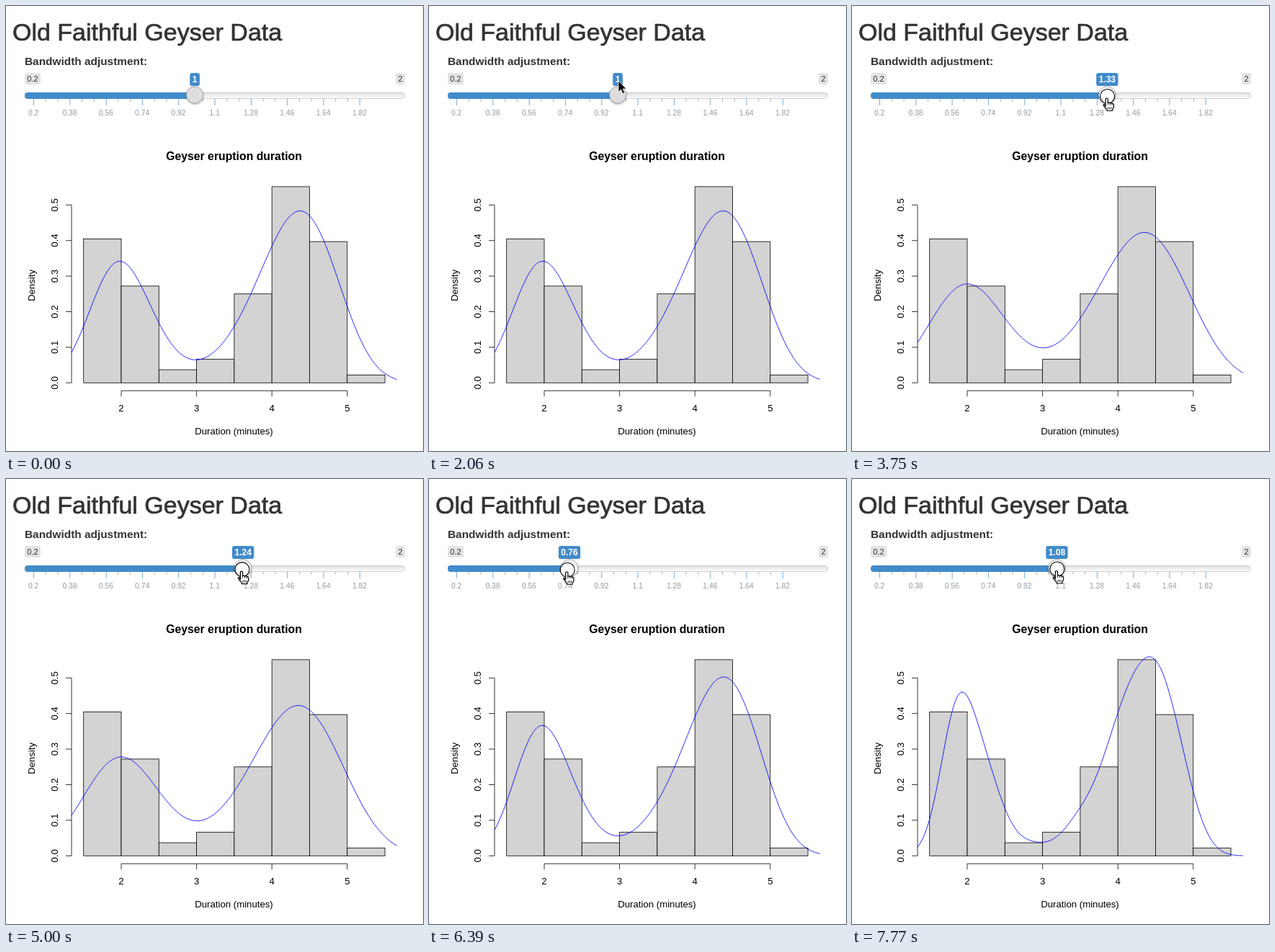
Recreate the animation shown at these times as an HTML page. Size 579 by 618 pixels, loop 8000 ms.

```html
<!DOCTYPE html>
<html lang="en">
<head>
<meta charset="utf-8">
<title>Geyser density</title>
<style>
html, body { margin: 0; width: 100%; height: 100%; overflow: hidden; background: #fff; }
svg { display: block; font-family: "Liberation Sans", Arial, sans-serif; }
.mid { text-anchor: middle; }
.line { fill: none; stroke: #000; stroke-width: .8; }
#bars rect { fill: #d3d3d3; stroke: #000; stroke-width: .8; }
#plot text { font-size: 13.2px; }
#grid text { font-size: 10.3px; fill: #939ba2; }
#knob { stroke: #ababab; filter: drop-shadow(0 1px 1.5px rgba(0, 0, 0, .35)); }
</style>
</head>
<body>
<svg width="579" height="618" viewBox="0 0 579 618">
  <defs>
    <linearGradient id="groove" x2="0" y2="1">
      <stop stop-color="#dedede"/><stop offset="1" stop-color="#fff"/>
    </linearGradient>
  </defs>
  <text x="9" y="48" font-size="34" fill="#333" stroke="#333" stroke-width=".7">Old Faithful Geyser Data</text>
  <text x="26" y="82" font-size="15.4" font-weight="bold" fill="#333">Bandwidth adjustment:</text>

  <g font-size="11" fill="#333" class="mid">
    <rect x="26" y="93" width="22" height="16" rx="3" fill="#e3e3e3"/>
    <text x="37" y="105">0.2</text>
    <rect x="541" y="93" width="13" height="16" rx="3" fill="#e3e3e3"/>
    <text x="547.5" y="105">2</text>
  </g>
  <g id="grid" class="mid"></g>
  <rect x="26.5" y="120.5" width="527" height="8" rx="4" fill="url(#groove)" stroke="#ccc"/>
  <rect id="fill" x="26" y="120" height="9" rx="4" fill="#428bca"/>
  <rect id="tag" y="93" height="18" rx="3" fill="#428bca"/>
  <text id="value" class="mid" y="106" font-size="12" font-weight="bold" fill="#fff"></text>
  <circle id="knob" cy="123.5" r="11.5"/>

  <g id="plot" class="mid">
    <text x="316.5" y="214" style="font-size:15.8px" font-weight="bold">Geyser eruption duration</text>
    <text x="316.5" y="595">Duration (minutes)</text>
    <text transform="translate(40 388) rotate(-90)">Density</text>
    <g id="bars"></g>
    <path id="axes" class="line"/>
    <path id="curve" fill="none" stroke="#00f" stroke-width=".85"/>
  </g>

  <path id="arrow" d="M0 0V15.5L3.6 12.2L6 17.8L8.6 16.7L6.2 11.2H11Z" stroke="#fff" stroke-width=".8"/>
  <g id="hand" stroke="#000">
    <circle id="press" r="10" fill="#fff" fill-opacity=".75" stroke-width="1.1"/>
    <path fill="#fff" stroke-width="1.2" stroke-linejoin="round" d="M-2.5 14V4.2q0-1.7 1.6-1.7t1.6 1.7V9q1.6-1 3 .4q1.6-.8 2.8 .6q2-.6 2.3 1.4v3.6l-1.8 3.5v1.5h-7.5v-1.2l-4.6-5.6q-1.2-2.4 1-2.2z"/>
    <path fill="none" stroke-width=".9" d="M.7 9v3M3.7 9.4v2.8M6.5 10v2.4M1 15v3M3.2 15v3M5.4 15v3"/>
  </g>
</svg>
<script>
const $ = id => document.getElementById(id);
const NS = 'http://www.w3.org/2000/svg';
function add(parent, tag, attrs, text = '') {
  const el = parent.appendChild(document.createElementNS(NS, tag));
  for (const k in attrs) el.setAttribute(k, attrs[k]);
  el.textContent = text;
}
const set = (id, attrs) => { for (const k in attrs) $(id).setAttribute(k, attrs[k]); };

// Eruption counts per 0.05 minutes, from 1.6
const counts = [
  1, 1, 1, 7, 9, 17, 6, 6, 10, 3, 5, 4, 5, 5, 3, 3, 5, 0, 1, 0, 1, 1, 0, 0,
  1, 0, 2, 0, 0, 1, 0, 0, 0, 0, 1, 3, 1, 1, 2, 2, 4, 0, 2, 4, 1, 7, 4, 4,
  6, 5, 9, 10, 2, 9, 5, 13, 6, 7, 10, 9, 9, 6, 7, 3, 9, 3, 3, 3, 1, 2, 1];
const total = 272, bandwidth = .3348;
const px = x => 160 + (x - 2) * 104.6;
const py = y => 523.3 - y * 494;

function density(x, adjust) {
  const bw = bandwidth * adjust;
  const sum = counts.reduce((s, n, i) => s + n * Math.exp(-(((x - 1.6 - i * .05) / bw) ** 2) / 2), 0);
  return sum / (total * bw * Math.sqrt(2 * Math.PI));
}
function curvePath(adjust) {
  const points = [];
  for (let x = 1.34; x <= 5.661; x += .02)
    points.push(px(x).toFixed(2) + ' ' + py(density(x, adjust)).toFixed(2));
  return 'M' + points.join('L');
}

// Histogram and axes
[55, 37, 5, 9, 34, 75, 54, 3].forEach((n, i) => {
  const top = py(n / total * 2);
  add($('bars'), 'rect', { x: px(1.5 + i / 2), y: top, width: 52.3, height: py(0) - top });
});
let axes = `M91 ${py(0)}V${py(.5)}M${px(2)} 534.3H${px(5)}`;
for (let i = 0; i < 6; i++) {
  const y = py(i / 10);
  axes += `M91 ${y}h-8`;
  add($('plot'), 'text', { transform: `translate(72 ${y}) rotate(-90)` }, (i / 10).toFixed(1));
}
for (let i = 2; i < 6; i++) {
  axes += `M${px(i)} 534.3v8`;
  add($('plot'), 'text', { x: px(i), y: 563 }, i);
}
set('axes', { d: axes });

// Slider scale
const sliderX = v => 38.5 + (v - .2) * 279.5;
for (let i = 0; i < 28; i++) {
  const x = sliderX(.2 + i * .06), big = i % 3 === 0;
  add($('grid'), 'path', { d: `M${x} 129v${big ? 9 : 4}`, stroke: big ? '#78abd8' : '#b0b0b0' });
  if (big) add($('grid'), 'text', { x: x - .3, y: 152 }, +(.2 + i * .06).toFixed(2));
}

const smooth = u => u * u * (3 - 2 * u);
const easeOut = u => 1 - (1 - u) ** 2;
// Pointer moves: start, end, from, to, easing
const moves = [
  [1410, 1790, [561, 65], [264.5, 93], easeOut],
  [1940, 2230, [264.5, 93], [261.8, 113], u => u ** .7],
  [2490, 2630, [261.8, 113.5], [262, 121.5], easeOut],
  [2990, 3450, [262, 121.5], [354.6, 125.5], easeOut],
  [4640, 5260, [354.6, 125.5], [234.2, 126], u => smooth(u ** 2.2)],
  [6240, 6620, [234.2, 126], [150.3, 126.5], u => smooth(u ** .75)],
  [7450, 7770, [150.3, 126.5], [284.8, 125], smooth]];
function pointer(t) {
  const [start, end, from, to, ease] = moves.findLast(m => m[0] <= t) || moves[0];
  const p = ease(Math.min(1, Math.max(0, (t - start) / (end - start))));
  return from.map((v, i) => v + (to[i] - v) * p);
}

const redraws = [[0, 1], [3750, 1.33], [5560, .9], [6920, .6]]
  .map(([time, adjust]) => [time, curvePath(adjust)]);
const show = (id, on) => set(id, { visibility: on ? 'visible' : 'hidden' });

function draw(t) {
  const [x, y] = pointer(t);
  const over = t >= 1940 && y > 111.5;
  const lag = t < 4000 ? 45 : 7;
  const handle = t < 2990 + lag ? sliderX(1) : pointer(t - lag)[0];
  const value = +(.2 + (handle - 38.5) / 279.5).toFixed(2);
  const cx = sliderX(value);

  $('value').textContent = value;
  set('value', { x: cx });
  const width = $('value').getComputedTextLength() + 7;
  set('tag', { x: cx - width / 2, width });
  set('fill', { width: cx - 26 });
  set('knob', { cx, fill: over ? '#fff' : '#dedede' });
  set('curve', { d: redraws.findLast(r => r[0] <= t)[1] });

  for (const id of ['arrow', 'hand']) set(id, { transform: `translate(${x} ${y})` });
  show('arrow', t >= 1410 && !over);
  show('hand', over);
  show('press', over && t >= 2490);
}

const began = performance.now();
function tick() {
  draw((performance.now() - began) % 8000);
  requestAnimationFrame(tick);
}
tick();
</script>
</body>
</html>
```
